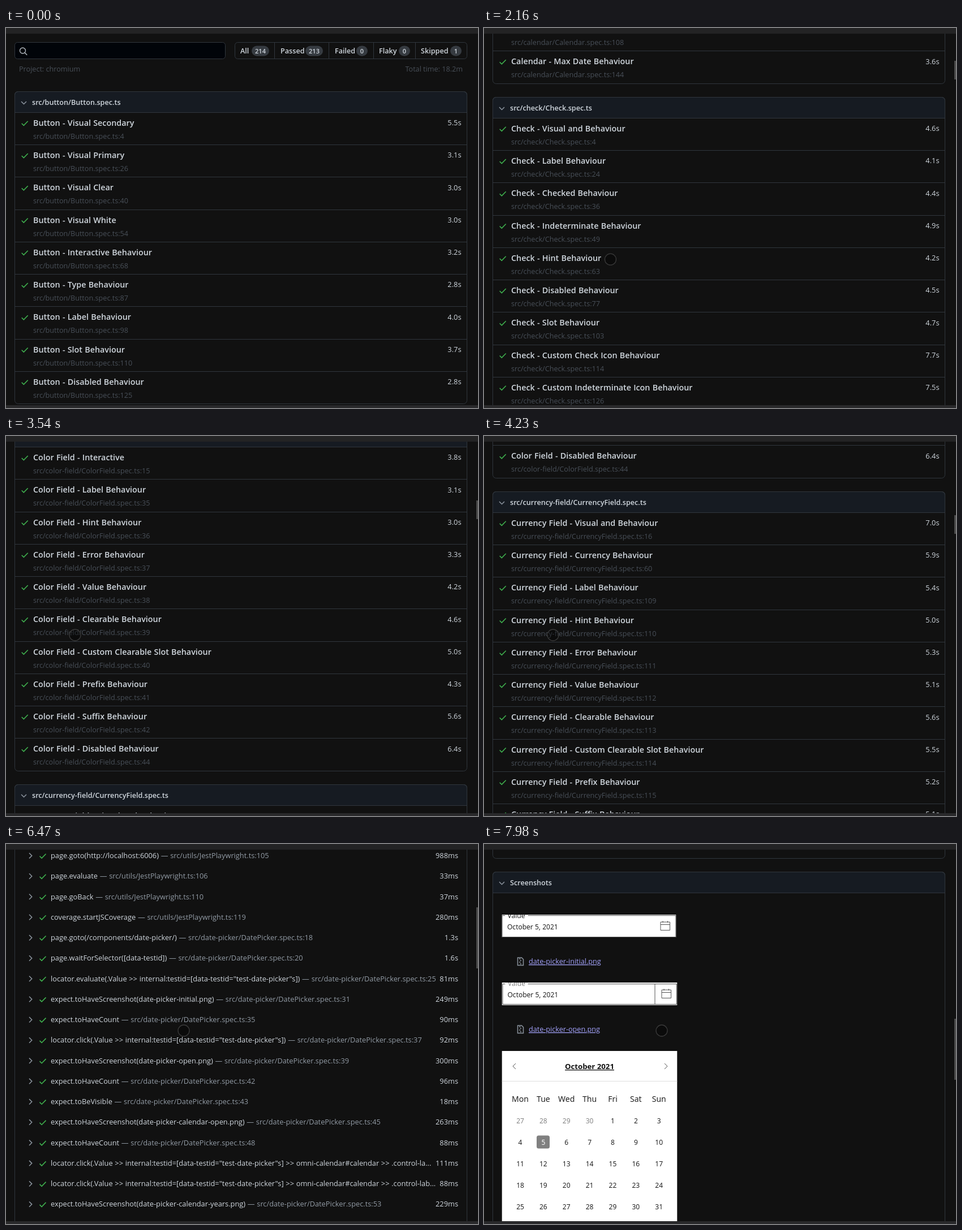
Recreate the animation shown at these times as an HTML page. Size 834 by 672 pixels, loop 8000 ms.

```html
<!DOCTYPE html>
<html lang="en">
<head>
<meta charset="utf-8">
<title>Test report</title>
<style>
  html, body { margin: 0; width: 100%; height: 100%; overflow: hidden; background: #111; }
  #stage { position: absolute; left: 0; top: 0; display: block; }
  text { font-family: "Open Sans", "Noto Sans", sans-serif; fill: #d0d7de; white-space: pre; }
  .title, .head { font-weight: 600; }
  .title { word-spacing: .5px; }
  .step { word-spacing: .4px; }
  .path { fill: #484f58; }
  .loc { fill: #929ba5; }
  .link { fill: #a3a2fb; text-decoration: underline; }
  .big { font-size: 28px; }
  .badge { font-size: 11px; font-weight: 600; text-anchor: middle; }
  .end { text-anchor: end; }
  .mid { text-anchor: middle; }
  .line { fill: none; stroke: #30363d; }
  .tick { fill: none; stroke: #3fb04e; stroke-width: 1.6; }
  .chev { fill: none; stroke: #8b949e; stroke-width: 1.5; }
  .shot text { font-family: "Noto Sans", "Open Sans", sans-serif; font-size: 12px; fill: #222; }
  .shot .day { font-size: 14px; }
  .shot .month { font-size: 13.2px; font-weight: 600; text-decoration: underline; fill: #111; }
  .shot .dim { fill: #858585; }
  .shot .on { fill: #fff; }
  .ink { fill: none; stroke: #555; }
</style>
</head>
<body>
<svg id="stage" width="834" height="672" viewBox="0 0 834 672">
  <rect width="834" height="672" fill="#111"/>
  <g id="list"></g>
  <g id="detail"></g>
  <rect id="thumb" x="831" width="3" fill="#4d4d4d"/>
  <rect width="834" height="10" fill="#232324"/>
  <rect y="667" width="834" height="5" fill="#29292b"/>
  <g id="pointer">
    <circle id="ring" r="10" fill="rgba(0,0,0,.35)" stroke="#3a3a3a" stroke-width="1.3"/>
    <g id="arrow">
      <circle r="11" fill="rgba(255,255,0,.5)"/>
      <path d="M0 0V15.5L3.6 12.2L6 17.6L8.4 16.5L6 11.3H11Z" fill="#fff" stroke="#222" stroke-width=".8"/>
    </g>
  </g>
</svg>
<script>
const $ = id => document.getElementById(id);
const ROW = 57.25, HEAD = 37.25, GAP = 24, STEP = 36.26, LOOP = 8000;

// One font size per text style, taken from a sample line of that style.
const pen = document.createElement('canvas').getContext('2d');
function fit(weight, sample, width) {
  pen.font = `${weight} 100px "Open Sans", "Noto Sans", sans-serif`;
  return (width / pen.measureText(sample).width * 100).toFixed(2);
}
const pick = '.Value >> internal:testid=[data-testid="test-date-picker"s]';
const spec = 'src/date-picker/DatePicker.spec.ts:';
const util = 'src/utils/JestPlaywright.ts:';
const sizes = {
  title: fit(600, 'Check - Custom Indeterminate Icon Behaviour', 318),
  head: fit(600, 'src/color-field/ColorField.spec.ts', 196),
  path: fit(400, 'src/color-field/ColorField.spec.ts:15', 206.5),
  step: fit(400, `locator.evaluate(${pick}) — ${spec}25`, 680)
};
const css = document.createElement('style');
css.textContent = Object.entries(sizes).map(([k, v]) => `.${k}{font-size:${v}px}`).join('');
document.head.append(css);

// Lines sit on half pixels and baselines on whole ones.
const crisp = y => Math.floor(y - .25) + .5;
const text = (x, y, cls, str) => `<text x="${x}" y="${Math.round(y)}" class="${cls}">${str}</text>`;
const path = (d, cls) => `<path d="${d}" class="${cls}"/>`;
const box = (x, y, w, h, fill, r = 0) =>
  `<rect x="${x}" y="${y}" width="${w}" height="${h}" rx="${r}" fill="${fill}"/>`;
const tick = (x, y) => path(`M${x - 5.5} ${y + .5}l3.6 3.6l7.4-7.6`, 'tick');

function panel(y, h, name) {
  const top = crisp(y), bar = crisp(y + HEAD) - top;
  return `<path d="M15.5 ${top + bar}v${6 - bar}q0-6 6-6h787q6 0 6 6v${bar - 6}z" fill="#161b22" stroke="#30363d"/>`
    + `<rect x="15.5" y="${top}" width="799" height="${crisp(y + h) - top}" rx="6" class="line"/>`
    + path(`M27 ${y + 17.8}l4.5 4.5l4.5-4.5`, 'chev')
    + text(46, y + 23.4, 'head', name);
}

function topBar() {
  const filters = [['All', 414, 214, 434, 31], ['Passed', 485, 213, 529, 31], ['Failed', 581, 0, 619, 20],
    ['Flaky', 659, 0, 694, 20], ['Skipped', 733, 1, 785, 20]];
  return '<rect x="15.5" y="25.5" width="372" height="29" rx="5" fill="#010409" stroke="#30363d"/>'
    + '<circle cx="29.5" cy="40" r="5" fill="none" stroke="#b4bac1" stroke-width="1.4"/>'
    + '<path d="M33 43.5l4.2 4.2" stroke="#b4bac1" stroke-width="1.5"/>'
    + '<rect x="404.5" y="25.5" width="410" height="29" rx="5" class="line"/>'
    + path('M474.5 26v29M570.5 26v29M649.5 26v29M723.5 26v29', 'line')
    + filters.map(([name, x, n, px, w]) => text(x, 45, 'head', name)
      + box(px, 31.5, w, 18, '#363b41', 9) + text(px + w / 2, 45, 'badge', n)).join('');
}

// Each row: name, source line, seconds.
const groups = [
  ['Button', 'button/Button', 'Visual Secondary,4,5.5;Visual Primary,26,3.1;Visual Clear,40,3.0;Visual White,54,3.0;Interactive Behaviour,68,3.2;Type Behaviour,87,2.8;Label Behaviour,98,4.0;Slot Behaviour,110,3.7;Disabled Behaviour,125,2.8'],
  ['Calendar', 'calendar/Calendar', 'Visual and Behaviour,5,4.0;Value Behaviour,59,3.5;Locale Behaviour,76,3.4;Min Date Behaviour,108,4.0;Max Date Behaviour,144,3.6'],
  ['Check', 'check/Check', 'Visual and Behaviour,4,4.6;Label Behaviour,24,4.1;Checked Behaviour,36,4.4;Indeterminate Behaviour,49,4.9;Hint Behaviour,63,4.2;Disabled Behaviour,77,4.5;Slot Behaviour,103,4.7;Custom Check Icon Behaviour,114,7.7;Custom Indeterminate Icon Behaviour,126,7.5'],
  ['Chip', 'chip/Chip', 'Visual and Behaviour,4,4.9;Label,28,4.7;Closable Behaviour,40,4.3;Disabled Behaviour,72,4.8;Icon Slot,99,5.1;Close Icon Slot,117,3.3'],
  ['Color Field', 'color-field/ColorField', 'Interactive,15,3.8;Label Behaviour,35,3.1;Hint Behaviour,36,3.0;Error Behaviour,37,3.3;Value Behaviour,38,4.2;Clearable Behaviour,39,4.6;Custom Clearable Slot Behaviour,40,5.0;Prefix Behaviour,41,4.3;Suffix Behaviour,42,5.6;Disabled Behaviour,44,6.4'],
  ['Currency Field', 'currency-field/CurrencyField', 'Visual and Behaviour,16,7.0;Currency Behaviour,60,5.9;Label Behaviour,109,5.4;Hint Behaviour,110,5.0;Error Behaviour,111,5.3;Value Behaviour,112,5.1;Clearable Behaviour,113,5.6;Custom Clearable Slot Behaviour,114,5.5;Prefix Behaviour,115,5.2;Suffix Behaviour,116,5.1;Disabled Behaviour,117,5.2'],
  ['Date Picker', 'date-picker/DatePicker', 'Visual and Behaviour,16,7.7;Value Behaviour,92,4.7;Locale Behaviour,115,5.1;Min Date Behaviour,152,5.1;Max Date Behaviour,200,6.2;Label Behaviour,248,4.6;Hint Behaviour,249,6.5;Error Behaviour,250,5.0']
];

function listPage() {
  let out = topBar() + text(23, 77, 'path', 'Project: chromium')
    + text(807, 77, 'path end', 'Total time: 18.2m');
  let y = 112.25;
  for (const [name, file, data] of groups) {
    const rows = data.split(';'), src = `src/${file}.spec.ts`;
    out += panel(y, HEAD + rows.length * ROW, src);
    y += HEAD;
    rows.forEach((row, i) => {
      const [label, line, secs] = row.split(',');
      if (i) out += path(`M16 ${crisp(y)}h798`, 'line');
      out += tick(33.2, y + 18.8) + text(48, y + 23.4, 'title', `${name} - ${label}`)
        + text(48, y + 46.3, 'path', `${src}:${line}`) + text(804.5, y + 22.6, 'step end', `${secs}s`);
      y += ROW;
    });
    y += GAP;
  }
  return out;
}

const shotOf = s => `expect.toHaveScreenshot(date-picker-${s}.png)`;
const deep = `locator.click(${pick} >> omni-calendar#calendar >> .control-la`;
const steps = [
  ['Before Hooks', '', '1.1s'],
  ['browserType.launch', util + 62, '412ms'],
  ['browser.newContext', util + 70, '38ms'],
  ['browserContext.newPage', util + 74, '296ms'],
  ['page.setViewportSize', util + 81, '21ms'],
  ['page.addInitScript', util + 86, '12ms'],
  ['page.route', util + 90, '9ms'],
  ['page.exposeFunction', util + 94, '14ms'],
  ['page.evaluate', util + 98, '17ms'],
  ['page.evaluate', util + 102, '16ms'],
  ['page.goto(http://localhost:6006)', util + 105, '988ms'],
  ['page.evaluate', util + 106, '33ms'],
  ['page.goBack', util + 110, '37ms'],
  ['coverage.startJSCoverage', util + 119, '280ms'],
  ['page.goto(/components/date-picker/)', spec + 18, '1.3s'],
  ['page.waitForSelector([data-testid])', spec + 20, '1.6s'],
  [`locator.evaluate(${pick})`, spec + 25, '81ms'],
  [shotOf('initial'), spec + 31, '249ms'],
  ['expect.toHaveCount', spec + 35, '90ms'],
  [`locator.click(${pick})`, spec + 37, '92ms'],
  [shotOf('open'), spec + 39, '300ms'],
  ['expect.toHaveCount', spec + 42, '96ms'],
  ['expect.toBeVisible', spec + 43, '18ms'],
  [shotOf('calendar-open'), spec + 45, '263ms'],
  ['expect.toHaveCount', spec + 48, '88ms'],
  [deep + '...', '', '111ms'],
  [deep + 'b...', '', '88ms'],
  [shotOf('calendar-years'), spec + 53, '229ms']
];
['months', 'days', 'next', 'selected'].forEach((s, i) => {
  const line = 56 + i * 8;
  steps.push([deep + 'b...', '', `${84 + i * 3}ms`], ['expect.toHaveCount', spec + line, `${89 + i}ms`],
    [shotOf('calendar-' + s), spec + (line + 3), `${231 + i * 9}ms`]);
});
steps.push(['expect.toBeVisible', spec + 88, '17ms'],
  ['coverage.stopJSCoverage', util + 126, '64ms'], ['After Hooks', '', '152ms']);

const shot = (y, w, h, body) =>
  `<svg class="shot" x="31.5" y="${y}" width="${w}" height="${h}">${box(0, 0, w, h, '#fff')}${body}</svg>`;
const calIcon = (x, y) => path(`M${x} ${y + 2}h16.5v14.5h-16.5zM${x} ${y + 6.5}h16.5M${x + 4} ${y}v3M${x + 12.5} ${y}v3`, 'ink');
const fileLink = (y, name) => path(`M59.5 ${y - 7}h7l3 3v10.5h-10zM62 ${y - 5}h2.5m-1 3h2.5m-4 3h2.5m-1 3h2.5`, 'chev')
  + text(79, y + 4, 'path link', name);

function monthView() {
  const x = c => 32.5 + c * 40.87;
  let out = text(155, 32, 'month mid', 'October 2021') + path('M24.5 22l-5 5l5 5M287.5 22l5 5l-5 5', 'ink')
    + '<path d="M0 53.5h310" stroke="#dedede"/>' + box(61.5, 149.5, 23, 23, '#808080', 3.5);
  'Mon Tue Wed Thu Fri Sat Sun'.split(' ').forEach((d, c) => { out += text(x(c), 90, 'day mid', d); });
  for (let i = 0; i < 35; i++) {
    const n = i < 4 ? 27 + i : i - 3;
    const cls = i < 4 ? 'dim' : n === 5 ? 'on' : '';
    out += text(x(i % 7), 127.5 + Math.floor(i / 7) * 38.2, `mid ${cls}`, n);
  }
  return out;
}

function detailPage() {
  let out = topBar() + text(16, 109, 'big', 'Date Picker - Visual and Behaviour')
    + text(16, 140, 'path', spec + 16) + text(814, 140, 'step end', '7.7s')
    + text(24, 181, 'head', 'Run') + path('M16 195.5h798', 'line')
    + panel(213, 1622.5, 'Test Steps');
  steps.forEach(([name, loc, time], i) => {
    const y = 277.9 + i * STEP;
    const tail = loc && `<tspan class="loc"> — ${loc}</tspan>`;
    out += path(`M41 ${y - 4.5}l4.7 4.7l-4.7 4.7`, 'chev') + tick(65, y + .5)
      + text(79, y + 4.5, 'step', name + tail) + text(799, y + 4.5, 'step end', time);
  });
  const top = 1810;
  return out + panel(top + 49.25, 900, 'Screenshots')
    + shot(top + 125, 308, 40, path('M6 1.5H.5v38h307v-38H46', 'ink') + text(10, 6, '', 'Value')
      + text(9.5, 26, '', 'October 5, 2021') + calIcon(280.5, 11))
    + fileLink(top + 208, 'date-picker-initial.png')
    + shot(top + 245, 310, 40, path('M6 2.5H1.5v36h307.5v-36H46M270.5 2v37', 'ink')
      + text(10.5, 6, 'dim', 'Value') + text(10, 26, '', 'October 5, 2021') + calIcon(282.5, 11))
    + fileLink(top + 328, 'date-picker-open.png')
    + shot(top + 366, 310, 345, monthView());
}

$('list').innerHTML = listPage();
$('detail').innerHTML = detailPage();

// The picture advances in 70 ms ticks inside these spans and rests between them.
const spans = [[70, 820], [1000, 1760], [1830, 2630], [2700, 3410], [3540, 4300], [4370, 4980], [5120, 5390],
  [5650, 6410], [6470, 6470], [6730, 7090], [7290, 7780], [7980, 7980]];
const listScroll = [[820, 0], [1000, 50], [1350, 394], [1760, 690], [1830, 720], [2630, 1275], [2700, 1325],
  [2770, 1381], [3410, 1975], [3540, 2035], [4300, 2660], [4370, 2700], [4980, 3115]];
const detailScroll = [[5860, 0], [6070, 300], [6280, 560], [6410, 615], [6470, 620], [6730, 670], [7090, 1090],
  [7290, 1150], [7640, 1720], [7780, 1795], [7980, 1810]];
const route = [[70, 696, 655], [210, 602, 540], [430, 400, 420], [600, 262, 345], [680, 239, 360], [820, 250, 392],
  [1000, 263, 398], [1830, 263, 398], [2630, 150, 430], [2770, 145, 428], [3410, 145, 428], [3540, 122, 352],
  [4980, 122, 352], [5120, 100, 310], [5260, 88, 284], [5390, 88, 284], [5650, 110, 290], [5860, 314, 330]];

function at(table, t, k = 1) {
  const i = table.findIndex(p => p[0] > t);
  if (i === 0) return table[0][k];
  if (i < 0) return table[table.length - 1][k];
  const a = table[i - 1], b = table[i];
  return a[k] + (b[k] - a[k]) * (t - a[0]) / (b[0] - a[0]);
}

function clock(t) {
  const span = spans.filter(s => s[0] <= t).pop();
  if (!span) return 0;
  const [start, end] = span;
  return t >= end ? end : start + Math.floor((t - start) / 70) * 70;
}

const show = (id, on) => $(id).setAttribute('visibility', on ? 'visible' : 'hidden');
const move = (id, x, y) => $(id).setAttribute('transform', `translate(${x} ${y})`);

function draw() {
  const t = clock(performance.now() % LOOP);
  const opened = t >= 5390;
  const scrolling = (t >= 1000 && t < 5120) || t >= 5860;
  const y = Math.round(at(opened ? detailScroll : listScroll, t));
  show('list', !opened);
  show('detail', opened);
  move(opened ? 'detail' : 'list', 0, -y);
  show('thumb', scrolling);
  $('thumb').setAttribute('y', Math.round(opened ? 10 + y * .165 : 12.5 + y * .05));
  $('thumb').setAttribute('height', opened ? 108 : 33);
  move('pointer', at(route, t, 1), at(route, t, 2));
  show('ring', scrolling);
  show('arrow', t >= 70 && !scrolling);
  requestAnimationFrame(draw);
}
draw();
</script>
</body>
</html>
```
